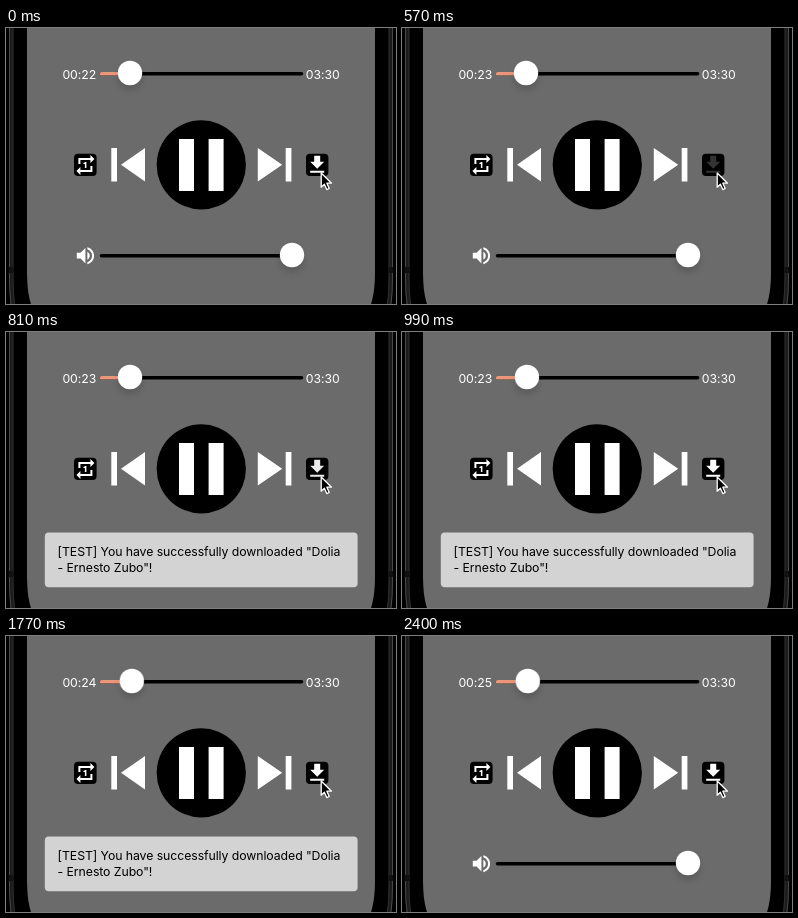
These frames come from a looping animation (390 by 276 pixels, 2.52 s). An HTML page:

```html
<!DOCTYPE html>
<html lang="en">
<head>
<meta charset="utf-8">
<title>Music player</title>
<style>
  html, body { margin: 0; width: 100%; height: 100%; overflow: hidden; background: #000; }
  svg { display: block; }
  #stage { width: 390px; height: 276px; }
  text { font: 12.3px Inter, "Liberation Sans", sans-serif; letter-spacing: -.08px; }
  .light { fill: #fff; }
  .track { stroke: #000; stroke-width: 3.6; stroke-linecap: round; }
  .played { stroke: #e9967a; }
  .thumb { fill: #fff; filter: drop-shadow(0 5px 3px rgba(0, 0, 0, .15)); }

  .clock, .seek, .press, .toast { animation: 2520ms infinite; }
  .clock { animation-name: clock; animation-timing-function: step-end; }
  .seek { animation-name: seek; animation-timing-function: step-end; }
  .toast { animation-name: toast; animation-timing-function: step-end; }
  .press { animation-name: press; animation-timing-function: cubic-bezier(.455, .03, .515, .955); }

  @keyframes clock {
    0% { transform: translateY(0); }
    19.04% { transform: translateY(-20px); }
    55.94% { transform: translateY(-40px); }
    92.85%, 100% { transform: translateY(-60px); }
  }
  @keyframes seek {
    0% { transform: translateX(0); }
    39.28% { transform: translateX(.9px); }
    70.23%, 100% { transform: translateX(1.8px); }
  }
  @keyframes press {
    0%, 17.86% { opacity: 1; }
    22.6%, 24.5% { opacity: .2; }
    34.5%, 100% { opacity: 1; }
  }
  @keyframes toast {
    0% { visibility: hidden; }
    23.8% { visibility: visible; }
    95.23%, 100% { visibility: hidden; }
  }
</style>
</head>
<body>
<svg id="stage" viewBox="0 0 390 276">
  <defs>
    <g id="bezel" fill="none">
      <path stroke="#1c1b1b" stroke-width="4" d="M5 0V250Q5 264 6.5 276"/>
      <path stroke="#4a4846" d="M3.5 0V250Q3.5 264 5 276"/>
      <path stroke="#333130" d="M7 0V250Q7 264 8.5 276"/>
      <path stroke="#111" stroke-width="5" d="M5 239V245"/>
    </g>
  </defs>

  <!-- phone -->
  <rect width="390" height="276"/>
  <use href="#bezel"/>
  <use href="#bezel" transform="translate(390 0) scale(-1 1)"/>
  <path fill="#6b6b6b" d="M21 0H369V242C369 256 368 267 365 276H25C22 267 21 256 21 242Z"/>

  <!-- progress -->
  <svg x="50" y="36" width="42" height="20">
    <g class="clock light">
      <text x="6.4" y="14.6">00:22</text>
      <text x="6.4" y="34.6">00:23</text>
      <text x="6.4" y="54.6">00:24</text>
      <text x="6.4" y="74.6">00:25</text>
    </g>
  </svg>
  <text class="light" x="299.8" y="50.6">03:30</text>
  <path class="track" d="M95.5 45.8H295.5"/>
  <path class="track played" d="M95.5 45.8H118"/>
  <g class="seek"><circle class="thumb" cx="124" cy="45" r="12.2"/></g>

  <!-- transport -->
  <circle cx="195.3" cy="136.9" r="44.6"/>
  <g class="light">
    <path d="M173 111h15v52h-15zM202.6 111h15v52h-15z"/>
    <path d="M105.3 120h5.7v33.6h-5.7zM139 120v33.6l-24-16.8z"/>
    <path d="M279.7 120h5.7v33.6h-5.7zM251.8 120v33.6l24.4-16.8z"/>
  </g>

  <!-- repeat and download -->
  <rect x="68" y="125.8" width="22.6" height="22.2" rx="4"/>
  <path class="light" transform="translate(67.4 125)"
    d="M7 7h10v3l4-4-4-4v3H5v6h2V7zm10 10H7v-3l-4 4 4 4v-3h12v-6h-2v4zm-4-2V9h-1l-2 1v1h1.5v4H13z"/>
  <rect x="300" y="125.8" width="22.4" height="22.2" rx="4"/>
  <g class="press">
    <path class="light" transform="translate(299.2 124.8)"
      d="M19 9h-4V3H9v6H5l7 7 7-7zM5 18v2h14v-2H5z"/>
  </g>

  <!-- volume -->
  <path class="light" transform="translate(67.9 216.2) scale(.96)"
    d="M3 9v6h4l5 5V4L7 9H3zm13.5 3c0-1.77-1.02-3.29-2.5-4.03v8.05c1.48-.73 2.5-2.25 2.5-4.02zM14 3.23v2.06c2.89.86 5 3.54 5 6.71s-2.11 5.85-5 6.71v2.06c4.01-.91 7-4.49 7-8.77s-2.99-7.86-7-8.77z"/>
  <path class="track" d="M95.5 227.8H288"/>
  <circle class="thumb" cx="286" cy="227" r="12.2"/>

  <g class="toast">
    <rect x="38.8" y="200.4" width="312.8" height="54.8" rx="4" fill="#d3d3d3"/>
    <text x="51.6" y="224.4">[TEST] You have successfully downloaded "Dolia</text>
    <text x="51.6" y="240">- Ernesto Zubo"!</text>
  </g>

  <!-- pointer -->
  <path d="M315.2 145v14.2l3.2-3 2.4 5.4 2.4-1.1-2.3-5.3h4.6z" stroke="#fff" stroke-width="1.3" stroke-linejoin="round"/>
</svg>
</body>
</html>
```
